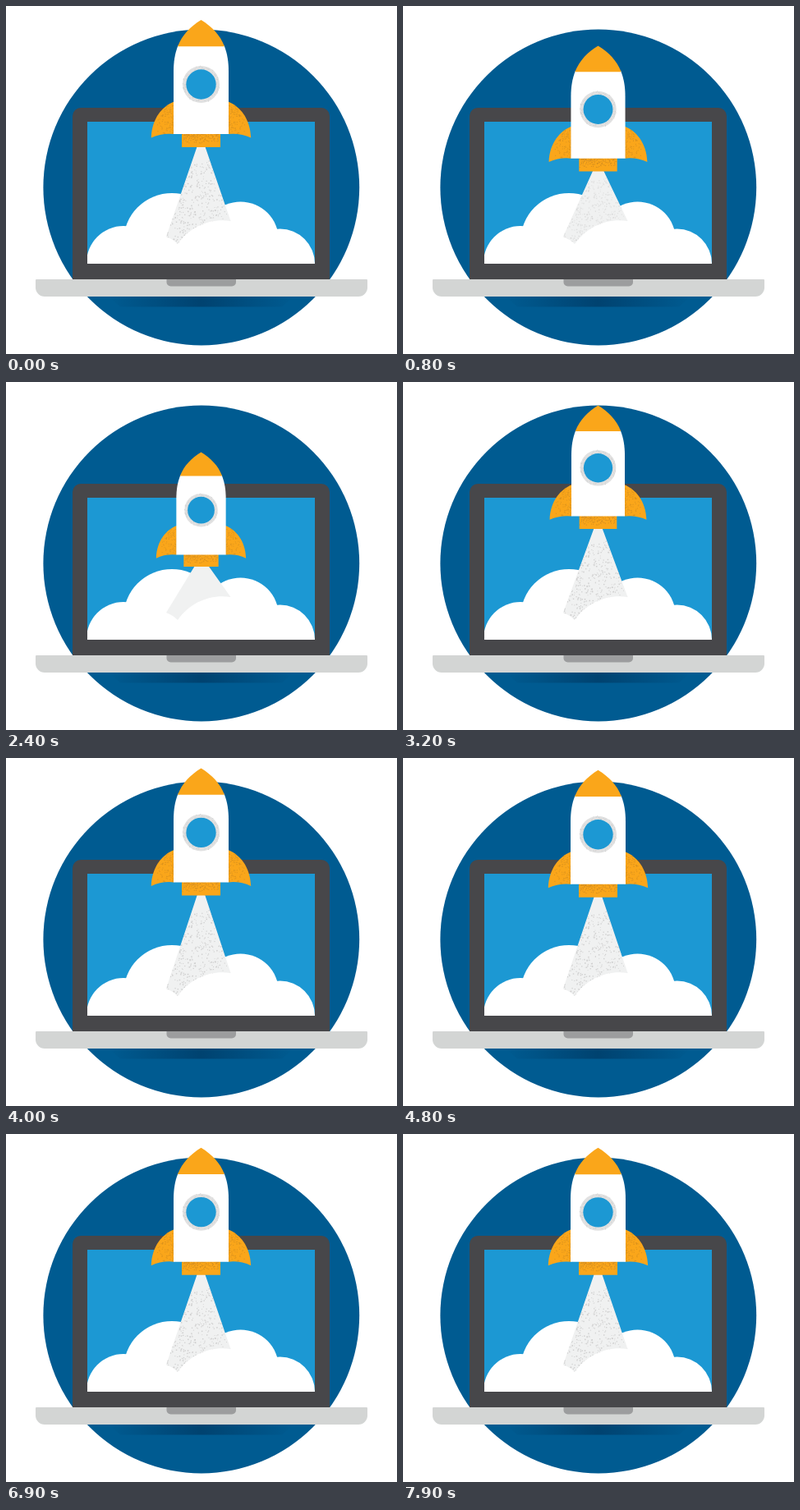
These frames come from a looping animation (476 px wide and 424 px high, 8 s). An HTML page with a canvas:

```html
<!DOCTYPE html>
<html lang="en">
<head>
<meta charset="utf-8">
<title>Rocket launch</title>
<style>
  html, body { margin: 0; width: 100%; height: 100%; overflow: hidden; background: #fff; }
  canvas { display: block; width: 476px; height: 424px; }
</style>
</head>
<body>
<canvas id="stage"></canvas>
<script>
const W = 476, H = 424, LOOP = 8000, STEP = 100, CX = 237.5;
const BLUE = '#1c98d3', NAVY = '#005b91', ORANGE = '#faa61a', DARK = '#47474a';
const SINK_END = 2400, LAUNCH = 2500, LAUNCH_END = 3520, SETTLE = 1150;
const REST = 172, LOW = 225, HIGH = 165;

const canvas = document.getElementById('stage');
const dpr = window.devicePixelRatio || 1;
canvas.width = W * dpr;
canvas.height = H * dpr;
const ctx = canvas.getContext('2d');

const mix = (a, b, k) => a + (b - a) * k;
const progress = (t, from, to) => Math.min(1, Math.max(0, (t - from) / (to - from)));
const smooth = u => u * u * (3 - 2 * u);

// Sink slowly, shoot up past the rest height, then drift back to it.
// base is the bottom of the nozzle
function pose(t) {
  if (t < LAUNCH) {
    const u = progress(t, 0, SINK_END);
    return { base: mix(LOW, REST, (1 - u) ** 2), size: mix(1, .9, smooth(u) ** 1.5) };
  }
  if (t < LAUNCH_END) {
    const k = smooth(progress(t, LAUNCH, LAUNCH_END));
    return { base: mix(LOW, HIGH, k), size: mix(.9, 1, k ** 1.3) };
  }
  return { base: mix(REST, HIGH, Math.exp((LAUNCH_END - t) / SETTLE)), size: 1 };
}

function seeded(seed) {
  return () => {
    seed = (seed * 1664525 + 1013904223) >>> 0;
    return seed / 4294967296;
  };
}

const rnd = seeded(7);
const scatter = (count, place) => Array.from({ length: count }, place);

const trailDots = scatter(480, () => ({
  u: rnd() ** 1.15, v: 1.1 - .8 * rnd() ** 2, r: .4 + rnd() * .4
}));
const nozzleDots = scatter(150, () => [mix(-23, 23, rnd()), -16 + 11 * rnd() ** 1.8]);
const finDots = scatter(130, () => [33 + 20 * rnd() ** 2, mix(-52, -16, rnd())]);
const ringDots = scatter(80, () => {
  const a = rnd() * Math.PI * 2, r = mix(18.5, 22.5, rnd());
  return [Math.cos(a) * r, -76.5 + Math.sin(a) * r];
});

function fill(color, d) {
  ctx.fillStyle = color;
  ctx.fill(new Path2D(d));
}

function box(color, x, y, w, h, radii = 0) {
  ctx.fillStyle = color;
  ctx.beginPath();
  ctx.roundRect(x, y, w, h, radii);
  ctx.fill();
}

function disc(color, x, y, r) {
  ctx.fillStyle = color;
  ctx.beginPath();
  ctx.arc(x, y, r, 0, Math.PI * 2);
  ctx.fill();
}

function speckle(color, dots) {
  ctx.fillStyle = color;
  for (const [x, y] of dots) ctx.fillRect(x - .5, y - .5, 1, 1);
}

function clipped(d, draw) {
  ctx.save();
  ctx.clip(new Path2D(d));
  draw();
  ctx.restore();
}

function drawShadow() {
  const g = ctx.createLinearGradient(125, 0, 350, 0);
  g.addColorStop(0, 'rgba(0,62,106,0)');
  g.addColorStop(.5, 'rgba(0,62,106,.85)');
  g.addColorStop(1, 'rgba(0,62,106,0)');
  fill(g, 'M125 354H350L336 366.5H139Z');
}

function drawLaptop() {
  box(DARK, 81, 124, 313, 210, [10, 10, 0, 0]);
  box(BLUE, 99, 141, 277, 173);
  box('#d3d5d4', 36, 333, 404, 21, [1, 1, 11, 11]);
  box('#9c9d9e', 195.5, 333, 84.5, 8.5, [0, 0, 5, 5]);
}

function drawCloud() {
  clipped('M99 141H376V314H99Z', () => {
    disc('#fff', 143, 313, 45);
    disc('#fff', 202, 287, 59);
    disc('#fff', 285.5, 285, 46.5);
    disc('#fff', 333.5, 314, 42.5);
    box('#fff', 143, 286, 190, 28);
  });
}

function drawTrail(base, size) {
  const top = base - 15 * size;
  const d = `M${CX} ${top}L273.5 262C250 258 224 268 209 290Q203 284 195 281Z`;
  fill('#f0f1f1', d);
  clipped(d, () => {
    ctx.globalAlpha = progress(base, 222, 182);
    ctx.fillStyle = '#d0d0d0';
    for (const { u, v, r } of trailDots) {
      const x = mix(CX, mix(195, 274, u), v);
      const y = mix(top, mix(281, 262, u), v);
      ctx.fillRect(x - r, y - r, 2 * r, 2 * r);
    }
  });
}

function drawFin(side) {
  const fin = 'M33 -55.5C47 -50 60 -35 60.7 -11.5Q48 -17.5 33 -16Z';
  ctx.save();
  ctx.scale(side, 1);
  fill(ORANGE, fin);
  clipped(fin, () => speckle('#d9921f', finDots));
  ctx.restore();
}

function drawRocket(base, size) {
  ctx.save();
  ctx.translate(CX, base);
  ctx.scale(size, size);

  drawFin(-1);
  drawFin(1);
  box(ORANGE, -23.5, -17, 47, 17);
  speckle('#d38d21', nozzleDots);

  fill('#fff', 'M-28 -124C-32 -114 -33.5 -104 -33.5 -92V-16H33.5V-92C33.5 -104 32 -114 28 -124Z');
  fill(ORANGE, 'M0 -155C13 -147 23 -137 28.5 -122.7H-28.5C-23 -137 -13 -147 0 -155Z');
  disc('#e1e1e1', 0, -76.5, 22.5);
  speckle('#d0d0d0', ringDots);
  disc(BLUE, 0, -76.5, 18.2);
  ctx.restore();
}

function draw(t) {
  const { base, size } = pose(t);
  ctx.setTransform(dpr, 0, 0, dpr, 0, 0);
  box('#fff', 0, 0, W, H);
  disc(NAVY, CX + .3, 221, 192.4);
  drawShadow();
  drawLaptop();
  drawCloud();
  drawTrail(base, size);
  drawRocket(base, size);
}

function tick() {
  const t = performance.now() % LOOP;
  draw(Math.floor(t / STEP) * STEP);
  requestAnimationFrame(tick);
}
tick();
</script>
</body>
</html>
```
